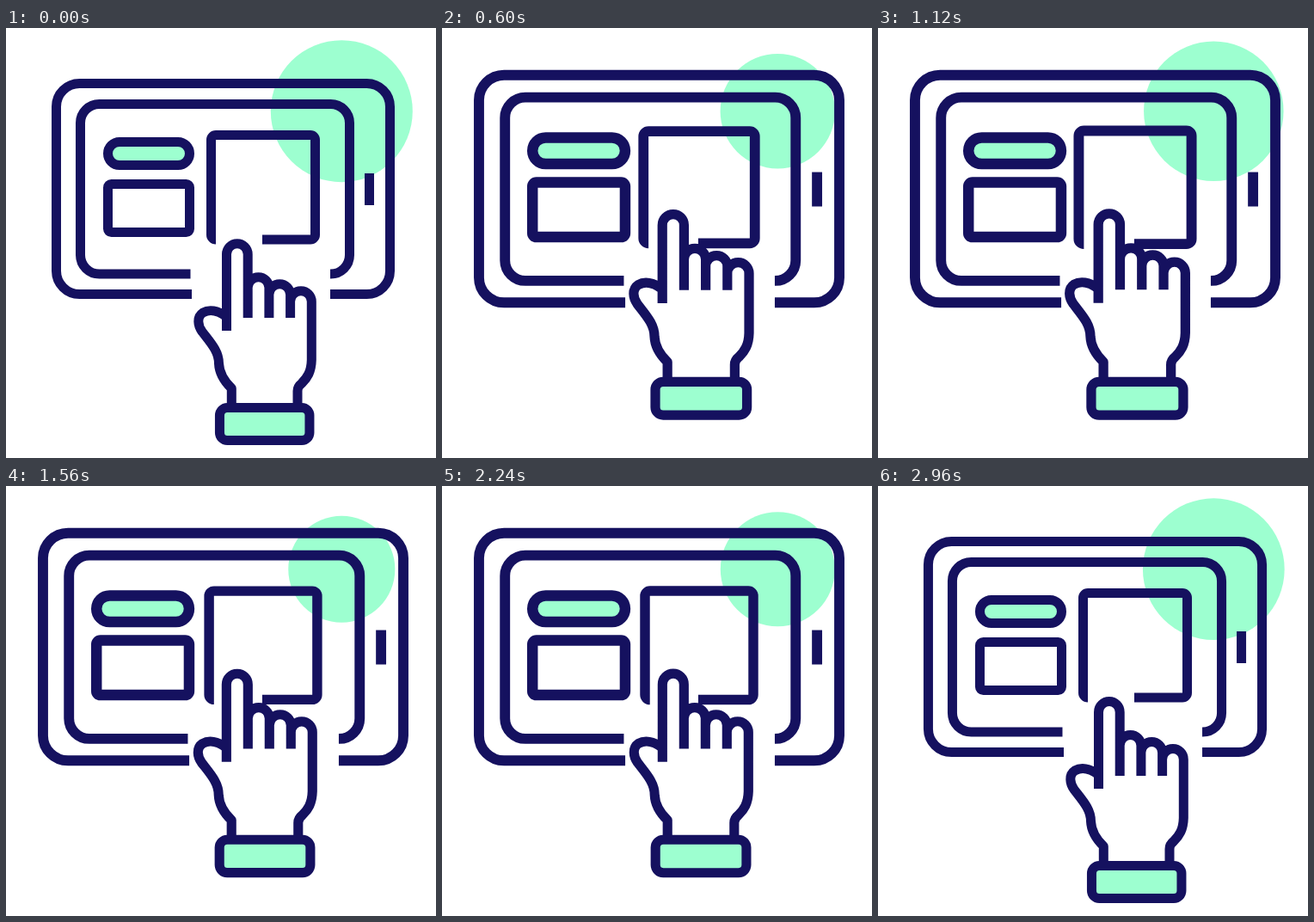
These frames come from a looping animation (500 px wide and 500 px high, 3 s). An HTML page with a canvas:

```html
<!DOCTYPE html>
<html lang="en">
<head>
<meta charset="utf-8">
<title>Tablet touch</title>
<style>
  html, body { margin: 0; width: 100%; height: 100%; overflow: hidden; background: #fff; }
  canvas { display: block; width: 500px; height: 500px; }
</style>
</head>
<body>
<canvas id="stage"></canvas>
<script>
const INK = '#15115f', MINT = '#9dffd0';
const LOOP = 3000, STEP = 40;
const canvas = document.getElementById('stage');
const ctx = canvas.getContext('2d');
const ratio = window.devicePixelRatio || 1;
canvas.width = canvas.height = 500 * ratio;

// Symmetric ease of t between two times
function ramp(t, from, to, k) {
  const u = Math.min(1, Math.max(0, (t - from) / (to - from)));
  return u < .5 ? Math.pow(2 * u, k) / 2 : 1 - Math.pow(2 - 2 * u, k) / 2;
}

const zoomAt = t => ramp(t, 0, 500, 2.4) - ramp(t, 2400, LOOP, 2.4);

// Two presses in a row, each a sine-squared pulse
function pressAt(t) {
  const n = (t - 360) / 1028;
  return n > 0 && n < 2 ? Math.sin(Math.PI * n) ** 2 : 0;
}

// The disc shrinks and swells three times; the second swell is weaker
function radiusAt(t) {
  const big = 82.5, small = 63;
  return big
    - (big - small) * (ramp(t, 0, 400, 2.2) - ramp(t, 400, 1020, 2.2))
    - (big - 62) * ramp(t, 1020, 1540, 2.2)
    + 13.8 * ramp(t, 1540, 1980, 2.2)
    - 12.8 * ramp(t, 1980, 2400, 2.2)
    + (big - small) * ramp(t, 2400, LOOP, 2.2);
}

// Box given by its centre and size
function box(cx, cy, w, h, r) {
  const p = new Path2D();
  p.roundRect(cx - w / 2, cy - h / 2, w, h, r);
  return p;
}

// Rounded frame whose bottom edge is open between xa and xb
function openFrame(x0, y0, x1, y1, r, xa, xb) {
  const p = new Path2D();
  p.moveTo(xa, y1);
  p.arcTo(x0, y1, x0, y0, r);
  p.arcTo(x0, y0, x1, y0, r);
  p.arcTo(x1, y0, x1, y1, r);
  p.arcTo(x1, y1, xb, y1, r);
  p.lineTo(xb, y1);
  return p;
}

function makeHand() {
  const p = new Path2D(), r = 12.35;
  // Index finger, then three knuckles stepping down to the right
  for (let i = 0; i < 4; i++) {
    const x = 256.5 + 2 * r * i, top = i ? 294 + 8 * i : 263;
    p.moveTo(x, i ? top : 352);
    p.lineTo(x, top);
    p.arc(x + r, top, r, Math.PI, 0);
    if (i < 3) p.lineTo(x + 2 * r, 337);
  }
  // Palm side
  p.lineTo(355.3, 386);
  p.bezierCurveTo(355, 400, 350, 407, 344, 413);
  p.quadraticCurveTo(339, 417, 339, 422);
  p.lineTo(339, 442);
  // Thumb side
  p.moveTo(256.5, 336);
  p.bezierCurveTo(246, 328, 236, 327, 229, 331);
  p.bezierCurveTo(221.5, 336, 223, 346, 228, 353);
  p.bezierCurveTo(238, 366, 247.5, 376, 247.5, 390);
  p.bezierCurveTo(248, 402, 254, 411, 262.3, 419);
  p.lineTo(262.3, 442);
  return p;
}

const shell = openFrame(58.5, 64.5, 446.5, 309.5, 27, 216, 377);
const screen = openFrame(86.5, 88.5, 399.5, 286, 22, 214.5, 377);
const tile = openFrame(238.5, 124.5, 359.5, 246, 5.5, 244, 298);
const pill = box(166, 146, 95, 27, 13.5);
const card = box(166, 209.5, 95, 56, 4);
const cuff = box(300.7, 460.5, 104.5, 38, 9);
const button = new Path2D('M422.5 169V206');
const hand = makeHand();

function draw(path, fill) {
  if (fill) {
    ctx.fillStyle = fill;
    ctx.fill(path);
  }
  ctx.stroke(path);
}

function scaled(x, y, s, paint) {
  ctx.save();
  ctx.translate(x, y);
  ctx.scale(s, s);
  ctx.translate(-x, -y);
  paint();
  ctx.restore();
}

function render(t) {
  const zoom = zoomAt(t), press = pressAt(t);

  ctx.setTransform(ratio, 0, 0, ratio, 0, 0);
  ctx.fillStyle = '#fff';
  ctx.fillRect(0, 0, 500, 500);
  ctx.strokeStyle = INK;
  ctx.lineWidth = 11;
  ctx.lineJoin = 'round';

  ctx.fillStyle = MINT;
  ctx.beginPath();
  ctx.arc(390.3, 96.7, radiusAt(t), 0, 7);
  ctx.fill();

  scaled(252.5, 187, 1 + .08 * zoom, () => {
    draw(shell);
    draw(screen);
    draw(button);
    const grow = 1 + .05 * zoom;
    scaled(166, 146, grow, () => draw(pill, MINT));
    scaled(166, 209.5, grow, () => draw(card));
  });

  scaled(299, 185.2, 1 + .157 * press, () => draw(tile));

  ctx.translate(0, -30.3 * zoom);
  scaled(270, 437, 1 + .045 * press, () => {
    draw(hand);
    draw(cuff, MINT);
  });
}

const start = performance.now();
function tick() {
  const t = (performance.now() - start) % LOOP;
  render(Math.floor(t / STEP) * STEP);
  requestAnimationFrame(tick);
}
tick();
</script>
</body>
</html>
```
